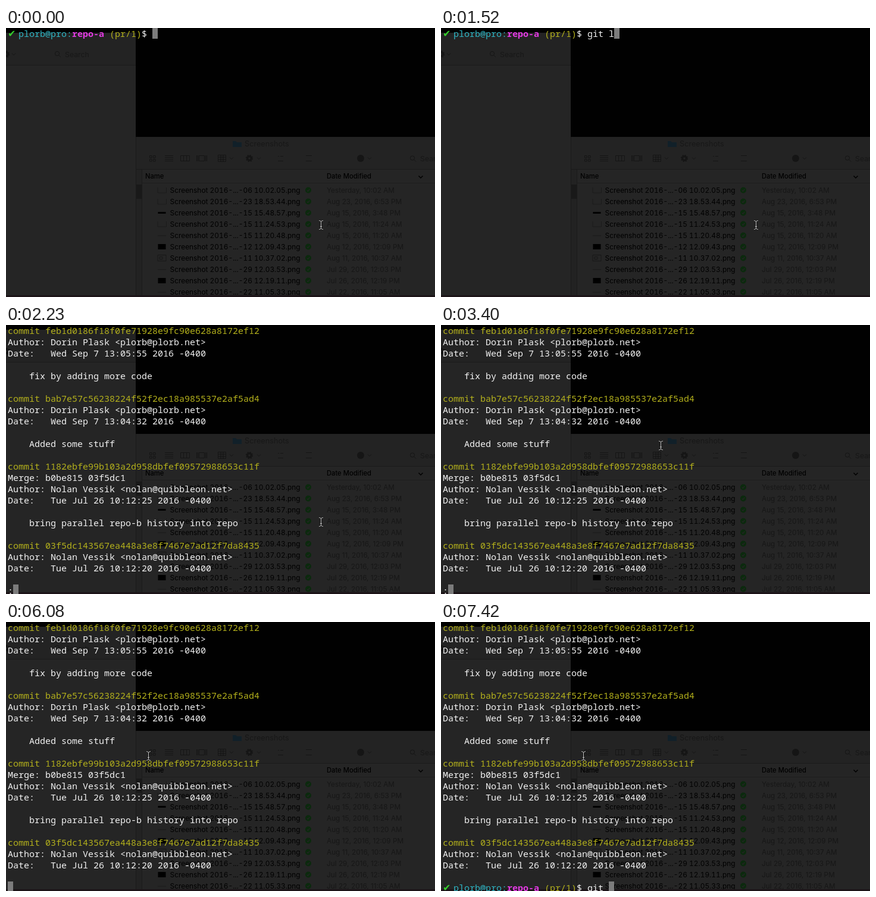
An HTML page with a canvas that plays this animation: 721x452 px, repeating every 8 s.

```html
<!DOCTYPE html>
<html lang="en">
<head>
<meta charset="utf-8">
<title>Terminal session</title>
<style>
  html, body { margin: 0; width: 100%; height: 100%; overflow: hidden; background: #010101; }
  svg, canvas { position: absolute; left: 0; top: 0; width: 721px; height: 452px; }
  text { font-family: Inter, Roboto, sans-serif; }
  .icon { fill: none; stroke: #151515; stroke-width: 1; }
  .solid { fill: #151515; }
  .dim { fill: #181818; }
  .head { font-size: 11.2px; font-weight: 500; fill: #000; }
  .file { font-size: 11.9px; font-variant-numeric: tabular-nums; fill: #000; }
  .date { font-size: 11.8px; fill: #171717; }
</style>
</head>
<body>
<svg viewBox="0 0 721 452">
  <defs>
    <g id="gear">
      <circle r="3.3" fill="none" stroke="#151515" stroke-width="3"/>
      <circle r="5.2" fill="none" stroke="#151515" stroke-width="1.8" stroke-dasharray="2.1 1.984"/>
    </g>
    <path id="chevron" class="icon" d="M-3 -1.5L0 1.5L3 -1.5"/>
    <g id="lens" class="icon"><circle r="3.6"/><path d="M2.6 2.6L6 6"/></g>
    <g id="badge">
      <circle r="5" fill="#0b2a0d"/>
      <path d="M-2.2 0.1L-0.6 1.8L2.4 -1.8" fill="none" stroke="#252525" stroke-width="1.3"/>
    </g>
  </defs>

  <!-- left window -->
  <rect y="8" width="218" height="444" fill="#252525"/>
  <rect y="8" width="218" height="54" fill="#232323"/>
  <rect y="62" width="218" height="1" fill="#1a1a1a"/>
  <use href="#gear" x="0" y="44"/>
  <use href="#chevron" x="13" y="44"/>
  <use href="#lens" x="86" y="43"/>
  <text class="dim" x="99" y="49" font-size="12.3">Search</text>

  <!-- right window -->
  <rect x="218" y="183" width="503" height="269" fill="#252525"/>
  <rect x="219" y="183" width="502" height="54" fill="#232323"/>
  <rect x="219" y="237" width="502" height="1" fill="#1a1a1a"/>
  <rect x="219" y="238" width="9" height="214" fill="#222"/>
  <rect x="219" y="263" width="9" height="24" fill="#191919"/>
  <path d="M218.5 183V452M228.5 238V452" stroke="#1a1a1a"/>
  <rect x="229" y="260" width="492" height="1" fill="#1e1e1e"/>

  <path d="M381 190h5l2 2h8v8h-15z" fill="#112029"/>
  <text class="dim" x="401" y="199" font-size="12.7">Screenshots</text>

  <path class="icon" d="M241.5 214.5h3.5v3.5h-3.5zM247.5 214.5h3.5v3.5h-3.5zM241.5 220.5h3.5v3.5h-3.5zM247.5 220.5h3.5v3.5h-3.5z"/>
  <path class="icon" d="M267 214.5h14M267 217.5h14M267 220.5h14M267 223.5h14"/>
  <path class="icon" d="M293.5 214.5h15v9h-15zM298.5 214.5v9M303.5 214.5v9"/>
  <path class="icon" d="M324.5 214.5h9v9h-9zM320.5 214v10M322.5 214v10M335.5 214v10M337.5 214v10"/>
  <path class="icon" d="M356.5 213.5h13v11h-13zM356.5 217h13M356.5 221h13M361 213.5v11M365 213.5v11"/>
  <use href="#chevron" x="379" y="219"/>
  <use href="#gear" x="409" y="219"/>
  <use href="#chevron" x="425" y="219"/>
  <path class="icon" d="M457 215.5h2M461 215.5h5M457 223.5h9"/>
  <path class="icon" d="M504 214.5h10M504 223.5h10"/>
  <circle class="solid" cx="596" cy="219" r="6"/>
  <use href="#chevron" x="611" y="219"/>
  <use href="#lens" x="683" y="218.5"/>
  <text class="dim" x="696" y="224" font-size="12.3">Search</text>

  <text class="head" x="234" y="253">Name</text>
  <text class="head" x="539" y="253">Date Modified</text>
  <path d="M693.5 248.5L697 252L700.5 248.5" fill="none" stroke="#000" stroke-width="1.5"/>
  <g id="files"></g>
  <rect y="449" width="721" height="3" fill="#1c1418"/>
</svg>
<canvas id="term"></canvas>

<script>
const files = [
  ["06 10.02.05", "Yesterday, 10:02 AM", "window"],
  ["23 18.53.44", "Aug 23, 2016, 6:53 PM", "window"],
  ["15 15.48.57", "Aug 15, 2016, 3:48 PM", "bar"],
  ["15 11.24.53", "Aug 15, 2016, 11:24 AM", "window"],
  ["15 11.20.48", "Aug 15, 2016, 11:20 AM", "line"],
  ["12 12.09.43", "Aug 12, 2016, 12:09 PM", "block"],
  ["11 10.37.02", "Aug 11, 2016, 10:37 AM", "photo"],
  ["29 12.03.53", "Jul 29, 2016, 12:03 PM", "line"],
  ["26 12.19.11", "Jul 26, 2016, 12:19 PM", "block"],
  ["22 11.05.33", "Jul 22, 2016, 11:05 AM", "line"]
];
const thumbs = {
  window: '<path class="icon" d="M255 -4.5V4.5H269.5V-4.5" stroke-opacity=".6"/>',
  bar: '<rect x="255.5" y="-1.5" width="13" height="3" fill="#000"/>',
  line: '<path class="icon" d="M255 .5h14" stroke-opacity=".7"/>',
  block: '<rect x="255.5" y="-4.5" width="13" height="9" fill="#000"/>',
  photo: '<path class="icon" d="M255 -5h14v10h-14zM258 -2h5v4h-5z" stroke-opacity=".8"/>'
};
document.getElementById("files").innerHTML = files.map(([stamp, date, kind], i) =>
  `<g transform="translate(0 ${272.5 + 19 * i})">${thumbs[kind]}
    <text class="file" x="275.5" y="4.5">Screenshot 2016-...-${stamp}.png</text>
    <use href="#badge" x="508"/>
    <text class="date" x="539" y="4.5">${date}</text></g>`).join("");

const W = 721, H = 452, LOOP = 8000;
const LEFT = 3, COL = 9, ROW = 19, LAST_ROW = 23, PROMPT_LEN = 27;
const WHITE = "#f2f2f2", YELLOW = "#b3b01c", CYAN = "#2eb5c4", MAGENTA = "#e23be2", GREEN = "#35d02c";
const MONO = '15px "Noto Sans Mono", "DejaVu Sans Mono", monospace';

const log = `commit feb1d0186f18f0fe71928e9fc90e628a8172ef12
Author: Dorin Plask <plorb@plorb.net>
Date:   Wed Sep 7 13:05:55 2016 -0400

    fix by adding more code

commit bab7e57c56238224f52f2ec18a985537e2af5ad4
Author: Dorin Plask <plorb@plorb.net>
Date:   Wed Sep 7 13:04:32 2016 -0400

    Added some stuff

commit 1182ebfe99b103a2d958dbfef09572988653c11f
Merge: b0be815 03f5dc1
Author: Nolan Vessik <nolan@quibbleon.net>
Date:   Tue Jul 26 10:12:25 2016 -0400

    bring parallel repo-b history into repo

commit 03f5dc143567ea448a3e8f7467e7ad12f7da8435
Author: Nolan Vessik <nolan@quibbleon.net>
Date:   Tue Jul 26 10:12:20 2016 -0400`.split("\n");

// [time, number of characters typed]
const firstKeys = [[630, 1], [800, 2], [980, 4], [1520, 5], [1790, 6], [1880, 7]];
const secondKeys = [[7070, 1], [7150, 2], [7330, 3], [7420, 4]];
const ENTER = 2140, LOG = 2230, QUIT = 6080, PROMPT = 6260;

// pointer moves in visible steps
const moves = [
  { times: [3310, 3400, 3490], from: [529.5, 331], to: [313.5, 157.5] },
  { times: [3660, 3750, 3840, 3930, 4020], from: [313.5, 157.5], to: [239.5, 225] }
];

const canvas = document.getElementById("term");
const ratio = window.devicePixelRatio || 1;
canvas.width = W * ratio;
canvas.height = H * ratio;
const ctx = canvas.getContext("2d");
ctx.scale(ratio, ratio);

function put(text, col, row, color, font = MONO) {
  ctx.font = font;
  ctx.fillStyle = color;
  ctx.fillText(text, LEFT + col * COL, row * ROW + 15);
}

function block(col, row) {
  ctx.fillStyle = "#7c7c7c";
  ctx.fillRect(LEFT + col * COL, row * ROW - 1, COL, ROW);
}

function prompt(row, typed) {
  put("✔", 0, row, GREEN, '16px "DejaVu Sans", sans-serif');
  put("plorb@pro:", 2, row, CYAN);
  put("repo-a", 12, row, MAGENTA, "bold " + MONO);
  put("(pr/1)", 19, row, YELLOW);
  put("$ " + typed, 25, row, WHITE);
}

function typedCount(keys, t) {
  return keys.reduce((n, [at, count]) => t >= at ? count : n, 0);
}

function drawCommand(row, text, keys, t) {
  const n = typedCount(keys, t);
  prompt(row, text.slice(0, n));
  return n;
}

function drawTerminal(t) {
  if (t < LOG) {
    const n = drawCommand(0, "git log", firstKeys, t);
    if (t < ENTER) {
      block(PROMPT_LEN + n, 0);
    } else {
      block(0, 1);
      ctx.strokeStyle = "#a0a0a0";
      ctx.lineWidth = 1;
      ctx.beginPath();
      ctx.moveTo(2, 5.5);
      ctx.lineTo(0.5, 5.5);
      ctx.lineTo(0.5, 14.5);
      ctx.lineTo(2, 14.5);
      ctx.stroke();
    }
    return;
  }
  log.forEach((line, row) => put(line, 0, row, line.startsWith("commit") ? YELLOW : WHITE));
  if (t < QUIT) {
    put(":", 0, LAST_ROW, WHITE);
    block(1, LAST_ROW);
  } else if (t < PROMPT) {
    block(0, LAST_ROW);
  } else {
    const n = drawCommand(LAST_ROW, "git ", secondKeys, t);
    block(PROMPT_LEN + n, LAST_ROW);
  }
}

function pointerAt(t) {
  let pos = moves[0].from;
  for (const { times, from, to } of moves) {
    const k = times.filter(at => t >= at).length / times.length;
    const e = k * k * (3 - 2 * k);
    if (k > 0) pos = from.map((v, i) => v + (to[i] - v) * e);
  }
  return pos;
}

function drawPointer([x, y]) {
  ctx.save();
  ctx.translate(x, y);
  ctx.beginPath();
  for (const s of [-1, 1]) {
    ctx.moveTo(-3.5, 7.5 * s);
    ctx.quadraticCurveTo(0, 7.5 * s, 0, 5 * s);
    ctx.quadraticCurveTo(0, 7.5 * s, 3.5, 7.5 * s);
  }
  ctx.moveTo(0, -5.5);
  ctx.lineTo(0, 5.5);
  ctx.moveTo(-1.5, 2.5);
  ctx.lineTo(1.5, 2.5);
  ctx.strokeStyle = "#111";
  ctx.lineWidth = 2.4;
  ctx.stroke();
  ctx.strokeStyle = "#c4c4c4";
  ctx.lineWidth = 1;
  ctx.stroke();
  ctx.restore();
}

const start = performance.now();

function frame() {
  const t = (performance.now() - start) % LOOP;
  ctx.clearRect(0, 0, W, H);
  drawTerminal(t);
  drawPointer(pointerAt(t));
  requestAnimationFrame(frame);
}
frame();
</script>
</body>
</html>
```
